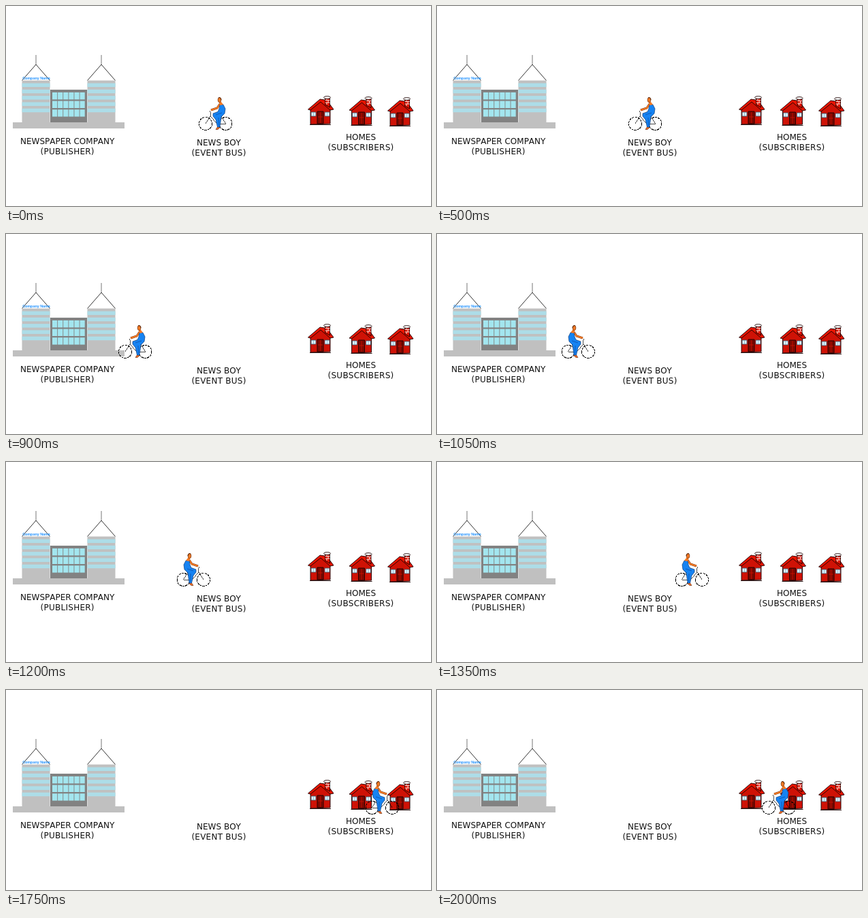
These frames come from a looping animation (624x294 px, 2.05 s). An HTML page:

```html
<!DOCTYPE html>
<html lang="en">
<head>
<meta charset="utf-8">
<title>Newspaper delivery</title>
<style>
  html, body { margin: 0; width: 100%; height: 100%; overflow: hidden; background: #fff; }
  svg { display: block; width: 624px; height: 294px; }
  text { font: 12px "DejaVu Sans", Verdana, sans-serif; text-anchor: middle; font-kerning: none; fill: #111; }
  text.wide { letter-spacing: .25px; }
  text.sign { font: bold 5.4px "Liberation Sans", Arial, sans-serif; fill: #1e90ff; }
</style>
</head>
<body>
<svg viewBox="0 0 624 294">
  <defs>
    <g id="tower">
      <path d="M20.500 0V14" stroke="#777"/>
      <path d="M0 37.500L20.500 14L41 37.500" fill="none" stroke="#333"/>
      <rect y="37.500" width="41" height="62" fill="#c0c0c0"/>
      <g id="bands" fill="#addde8"></g>
    </g>

    <g id="house" stroke="#1a0000" stroke-width=".9">
      <path d="M4 18L18 7L33 18V41L4 42Z" fill="#cf1206"/>
      <path d="M18 5L28 6.500L38 20L33 21L19 9L4 21L.5 20Z" fill="#e81400"/>
      <path d="M25.500 3V13L32.500 17V3Z" fill="#e01400"/>
      <path d="M25.500 6.500H32.500M25.500 10H32.500M28 4V6M30 7V10M28 10V13" stroke="#fff" stroke-width=".8"/>
      <ellipse cx="28.500" cy="2.500" rx="5" ry="1.900" fill="#fff"/>
      <path d="M14 23H23V41H14Z" fill="#7d0800"/>
      <path d="M18.500 24V40M15 31H22" stroke="#d01000" stroke-width=".8"/>
      <path d="M5 24H12V30H5ZM25 24H32V30H25Z" fill="#dff4ff" stroke="#456"/>
      <path d="M8.500 24V30M28.500 24V30" stroke="#79a9c4" stroke-width=".8"/>
      <path d="M3 42.500H34"/>
    </g>

    <g id="cyclist">
      <g fill="none" stroke="#000" shape-rendering="crispEdges">
        <g stroke-dasharray="3.200 1.200">
          <circle cx="10" cy="39" r="9.500"/>
          <circle cx="39.500" cy="39" r="9.500"/>
        </g>
        <path d="M10 39L18 26L16.500 20M17 28L27 39H39.500L33 28" stroke-width=".7"/>
      </g>
      <path d="M31 10L27 16L18 19" fill="none" stroke="#7a3510" stroke-width="3"/>
      <path d="M31 10L27 16L18 19" fill="none" stroke="#f47a24" stroke-width="2.200"/>
      <path d="M28 43L31.500 44.500L28 47.500H25Z" fill="#f06a20" stroke="#612a10" stroke-width=".6"/>
      <path d="M31 10L36 11L39 17L38 24L33 29L31 44H27.500L25 33L21 28L21 24L28 21.500L30 17Z"
            fill="#1683f2" stroke="#123b78" stroke-width=".7"/>
      <path d="M25 26L34 23M29 30L29.500 42" stroke="#0c50ad" fill="none" stroke-width=".8"/>
      <path d="M29.500 7H33L36 11L31 12Z" fill="#f47a24"/>
      <ellipse cx="30.500" cy="4" rx="2.400" ry="3.600" fill="#f47a24" stroke="#6b2c0c" stroke-width=".7"/>
      <path d="M29 .8Q32.500 0 33 4" fill="none" stroke="#4b2008"/>
    </g>
  </defs>

  <rect width="624" height="294" fill="#fff"/>

  <use href="#tower" x="23.500" y="72"/>
  <use href="#tower" x="119.500" y="72"/>
  <text class="sign" x="44.500" y="108">Company Name</text>
  <rect x="65" y="123" width="54" height="48" fill="#828282"/>
  <g id="panes" fill="#a3e6ef"></g>
  <rect x="10" y="171" width="164" height="9" fill="#c0c0c0"/>

  <use href="#house" x="443" y="132"/>
  <use href="#house" x="503.500" y="133"/>
  <use href="#house" x="560" y="134"/>

  <text x="90.200" y="203">NEWSPAPER COMPANY</text>
  <text class="wide" x="90.200" y="218">(PUBLISHER)</text>
  <text x="312.500" y="205">NEWS BOY</text>
  <text class="wide" x="312.500" y="220">(EVENT BUS)</text>
  <text x="521" y="197">HOMES</text>
  <text class="wide" x="521" y="212">(SUBSCRIBERS)</text>

  <use href="#cyclist" id="rider"/>
</svg>

<script>
const LOOP = 2050, STEP = 50;
const rider = document.getElementById("rider");

function addRect(id, x, y, width, height) {
  const r = document.createElementNS("http://www.w3.org/2000/svg", "rect");
  for (const [k, v] of Object.entries({ x, y, width, height })) r.setAttribute(k, v);
  document.getElementById(id).append(r);
}

for (let i = 0; i < 5; i++) addRect("bands", 0, 41.5 + i * 9.3, 41, 5.5);
for (let row = 0; row < 3; row++)
  for (let col = 0; col < 6; col++) addRect("panes", 68 + col * 8.1, 127 + row * 12.6, 7.2, 10.4);

// Each leg: start ms, end ms, start x, end x, facing right
const legs = [
  [0, 450, 283, 283, false],
  [500, 950, 281, 150, false],
  [1000, 1200, 159, 249.5, true],
  [1200, 1500, 249.5, 448.5, true],
  [1500, 1550, 448.5, 478, true],
  [1550, 1800, 478, 539, true],
  [1850, 2000, 545, 477, false]
];

function draw(ms) {
  const t = Math.floor((ms % LOOP) / STEP) * STEP;
  const [t0, t1, x0, x1, right] = legs.findLast(leg => t >= leg[0]);
  const x = Math.round(x0 + (x1 - x0) * Math.min(1, (t - t0) / (t1 - t0)));
  rider.setAttribute("transform", right ? `translate(${x + 50} 134) scale(-1 1)` : `translate(${x} 134)`);
}

const start = performance.now();
function tick() {
  draw(performance.now() - start);
  requestAnimationFrame(tick);
}
tick();
</script>
</body>
</html>
```
